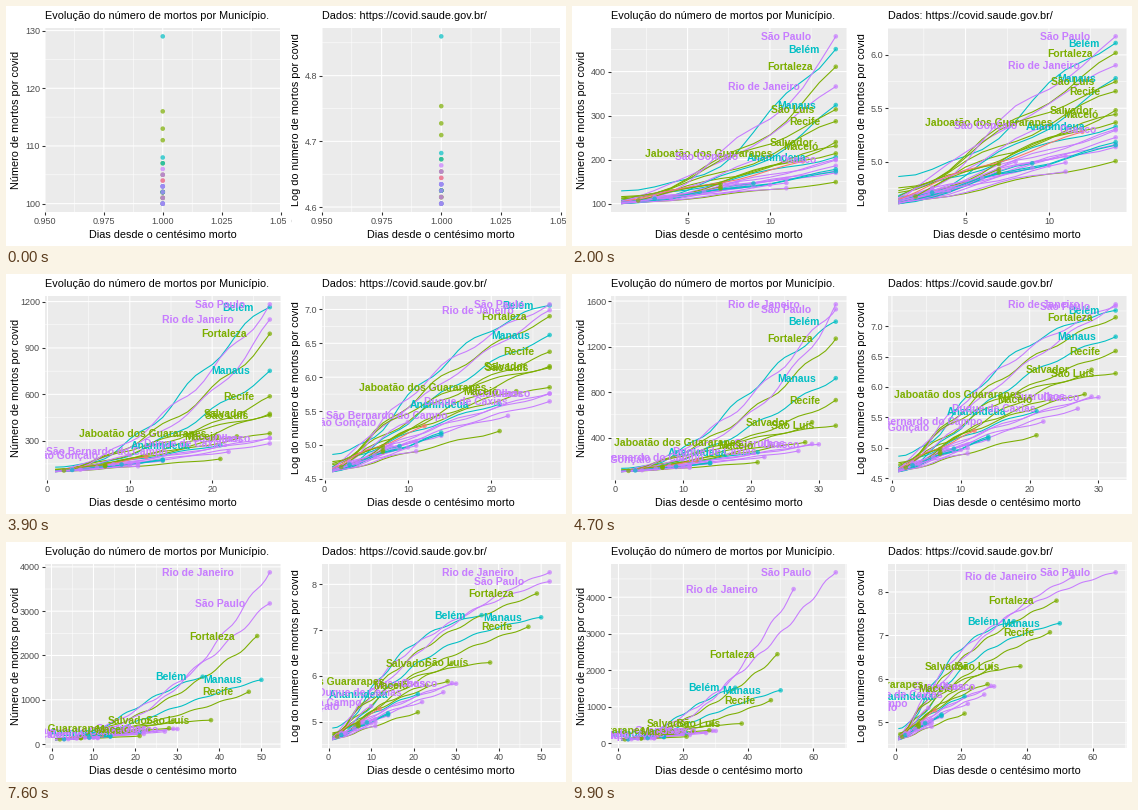
Recreate the animation shown at these times as a matplotlib script. Size 560 by 240 pixels, loop 10000 ms.

```python
import math

import matplotlib.pyplot as plt
import numpy as np
from matplotlib.animation import FuncAnimation
from matplotlib.patches import Rectangle
from matplotlib.transforms import ScaledTranslation

W, H, DPI = 560, 240, 80
PX = 72 / DPI  # points per pixel
FRAMES, INTERVAL = 100, 100
LAST_DAY = 67
TOP, BOTTOM = 22, 206

plt.rcParams.update({"font.family": "Liberation Sans", "path.snap": False})

COLORS = {"CO": "#F8766D", "NE": "#7CAE00", "N": "#00BFC4", "SE": "#C77CFF"}

DAYS = np.arange(1, LAST_DAY + 1)
DAY_FRAME = np.array([round((FRAMES - 1) * (d - 1) / (LAST_DAY - 1)) for d in DAYS])

rng = np.random.default_rng(7)


def city(name, region, last, final, start=None, power=1.15, bend=0, pace=0):
    """Daily deaths: steady pace plus a power curve that bends into an S."""
    if start is None:
        start = rng.integers(100, 109)
    days = DAYS[:last]
    # weekly reporting rhythm
    clock = days + 0.5 * np.sin(2 * np.pi * days / 7 + rng.uniform(0, 2 * np.pi))
    w = ((clock - clock[0]) / max(clock[-1] - clock[0], 1e-9)) ** power
    steady = pace * (days - 1)
    rest = final - start - steady[-1]
    return name, region, np.round(start + steady + rest * (1 + bend) * w / (1 + bend * w))


def small_city():
    region = rng.choice(["SE", "NE", "N"], p=[0.55, 0.3, 0.15])
    last = int(rng.integers(2, 15))
    return city("", region, last, 104 + rng.uniform(3, 7) * (last - 1),
                start=rng.integers(100, 104))


CITIES = [
    city("Ananindeua", "N", 21, 271),
    city("Belém", "N", 36, 1520, start=129, power=2.4, bend=2.1),
    city("Duque de Caxias", "SE", 27, 282),
    city("Fortaleza", "NE", 49, 2440, start=116, power=1.6),
    city("Guarulhos", "SE", 29, 344),
    city("Jaboatão dos Guararapes", "NE", 28, 358),
    city("Maceió", "NE", 23, 328),
    city("Manaus", "N", 50, 1450, power=1.9, bend=1.1),
    city("Osasco", "SE", 30, 340),
    city("Recife", "NE", 47, 1180, start=111, power=1.45),
    city("Rio de Janeiro", "SE", 54, 4222, power=3, bend=0.6, pace=14),
    city("Salvador", "NE", 29, 535, power=1.45),
    city("São Bernardo do Campo", "SE", 22, 228),
    city("São Gonçalo", "SE", 10, 208),
    city("São Luís", "NE", 38, 540, start=113, power=1.4, bend=1.8),
    city("São Paulo", "SE", 67, 4680, power=1.55),
    city("", "CO", 12, 196, start=104),
    city("", "NE", 21, 182, start=100),
] + [small_city() for _ in range(19)]


def breaks(lo, hi, m=5):
    """Extended Wilkinson tick positions."""
    nice = [1, 5, 2, 2.5, 4, 3]
    size = hi - lo

    def score(s, c, d):
        return 0.25 * s + 0.2 * c + 0.5 * d + 0.05

    best, found = -2, (lo, size, 2)
    for j in range(1, 50):
        for i, q in enumerate(nice):
            simple = 1 - i / (len(nice) - 1) - j
            if score(simple + 1, 1, 1) < best:
                start, step, k = found
                return start + step * np.arange(k)
            for k in range(2, 50):
                dense = 2 - (k - 1) / (m - 1) if k >= m else 1
                if score(simple + 1, 1, dense) < best:
                    break
                z = math.ceil(math.log10(size / (k + 1) / j / q))
                while True:
                    step = j * q * 10.0 ** z
                    z += 1
                    span = step * (k - 1)
                    half = max(span - size, 0) / 2
                    if score(simple + 1, 1 - (half / (0.1 * size)) ** 2, dense) < best:
                        break
                    first = math.floor(hi / step) * j - (k - 1) * j
                    for n in range(first, math.ceil(lo / step) * j + 1):
                        a = n * step / j
                        b = a + span
                        zero = n % j == 0 and a <= 0 <= b
                        cover = 1 - 0.5 * ((hi - b) ** 2 + (lo - a) ** 2) / (0.1 * size) ** 2
                        r = (k - 1) / span
                        rt = (m - 1) / (max(b, hi) - min(a, lo))
                        total = score(simple + zero, cover, 2 - max(r / rt, rt / r))
                        if total > best:
                            best, found = total, (a, step, k)
    start, step, k = found
    return start + step * np.arange(k)


def tick_text(values):
    places = next((p for p in range(5)
                   if np.allclose(values, np.round(values, p), rtol=0, atol=1e-7)), 5)
    return [f"{abs(v) if abs(v) < 1e-9 else v:.{places}f}" for v in values]


def set_axis(axis, set_lim, lo, hi):
    pad = 0.05 * (hi - lo) if hi > lo else 0.05
    lo, hi = lo - pad, hi + pad
    major = breaks(lo, hi)
    step = major[1] - major[0]
    minor = np.append(major - step / 2, major[-1] + step / 2)

    def inside(v):
        return v[(v >= lo - 1e-9) & (v <= hi + 1e-9)]

    major, minor = inside(major), inside(minor)
    axis.set_ticks(major, labels=tick_text(major))
    axis.set_ticks(minor, minor=True)
    set_lim(lo, hi)


class Panel:
    def __init__(self, fig, left, right, offset, title, ylabel, scale):
        self.ax = ax = fig.add_axes([left / W, 1 - BOTTOM / H,
                                     (right - left) / W, (BOTTOM - TOP) / H])
        ax.set_facecolor("#EBEBEB")
        ax.set_axisbelow(True)
        for spine in ax.spines.values():
            spine.set_visible(False)
        ax.grid(True, which="major", color="white", lw=1.07 * PX)
        ax.grid(True, which="minor", color="white", lw=0.53 * PX)
        ax.tick_params(which="major", length=2.75 * PX, width=1.07 * PX, pad=2.2 * PX,
                       color="#333333", labelcolor="#4D4D4D", labelsize=9 * PX)
        ax.tick_params(which="minor", length=0)

        def note(x, y, s, **kw):
            fig.text(x / W, 1 - y / H, s, size=10.9 * PX, va="baseline", **kw)

        note(left, 13, title)
        note((left + right) / 2, 232, "Dias desde o centésimo morto", ha="center")
        note(offset + 13, (TOP + BOTTOM) / 2, ylabel, ha="center",
             rotation=90, rotation_mode="anchor")

        colors = [COLORS[region] for _, region, _ in CITIES]
        self.series = [scale(counts) for _, _, counts in CITIES]
        self.lines = [ax.plot([], [], color=c, lw=1.07 * PX)[0] for c in colors]
        self.dots = ax.scatter(np.ones(len(CITIES)), np.ones(len(CITIES)),
                               s=(4.6 * PX) ** 2, c=colors,
                               alpha=0.7, linewidths=0, zorder=3)
        self.labels = [self.label(fig, c[0], color) for c, color in zip(CITIES, colors)]

    def label(self, fig, name, color):
        text = self.ax.text(0, 0, name, size=10.33 * PX, weight="bold", color=color,
                            ha="center", va="baseline", clip_on=True, zorder=4)
        width = text.get_window_extent(fig.canvas.get_renderer()).width if name else 0
        # the name ends half its width left of the dot
        text.set_transform(self.ax.transData + ScaledTranslation(
            -width / DPI, -3.6 / DPI, fig.dpi_scale_trans))
        return text

    def draw(self, k):
        heads, low, high = [], np.inf, -np.inf
        for (_, _, counts), v, line, text in zip(CITIES, self.series, self.lines, self.labels):
            n = len(v)
            at = DAY_FRAME[:n]
            x, y = np.interp(k, at, DAYS[:n]), np.interp(k, at, v)
            seen = np.count_nonzero(at <= k)
            line.set_data(np.append(DAYS[:seen], x), np.append(v[:seen], y))
            heads.append((x, y))
            text.set_position((x, y))
            text.set_visible(counts[min(np.searchsorted(at, k), n - 1)] > 200)
            low, high = min(low, v[0]), max(high, y)
        self.dots.set_offsets(heads)
        set_axis(self.ax.xaxis, self.ax.set_xlim, 1, np.interp(k, DAY_FRAME, DAYS))
        set_axis(self.ax.yaxis, self.ax.set_ylim, low, high)


fig = plt.figure(figsize=(W / DPI, H / DPI), dpi=DPI, facecolor="white")
panels = [
    Panel(fig, 39, 274.5, 0, "Evolução do número de mortos por Município.",
          "Número de mortos por covid", np.array),
    Panel(fig, 316, 554.5, 280, "Dados: https://covid.saude.gov.br/",
          "Log do número de mortos por covid", np.log),
]
# tick labels of the left half end at its edge
fig.add_artist(Rectangle((280 / W, 0), 5 / W, 1, transform=fig.transFigure,
                         color="white", lw=0, zorder=10))


def update(k):
    for panel in panels:
        panel.draw(k)


anim = FuncAnimation(fig, update, frames=FRAMES, interval=INTERVAL,
                     repeat=True, repeat_delay=0, blit=False)
plt.show()
```
